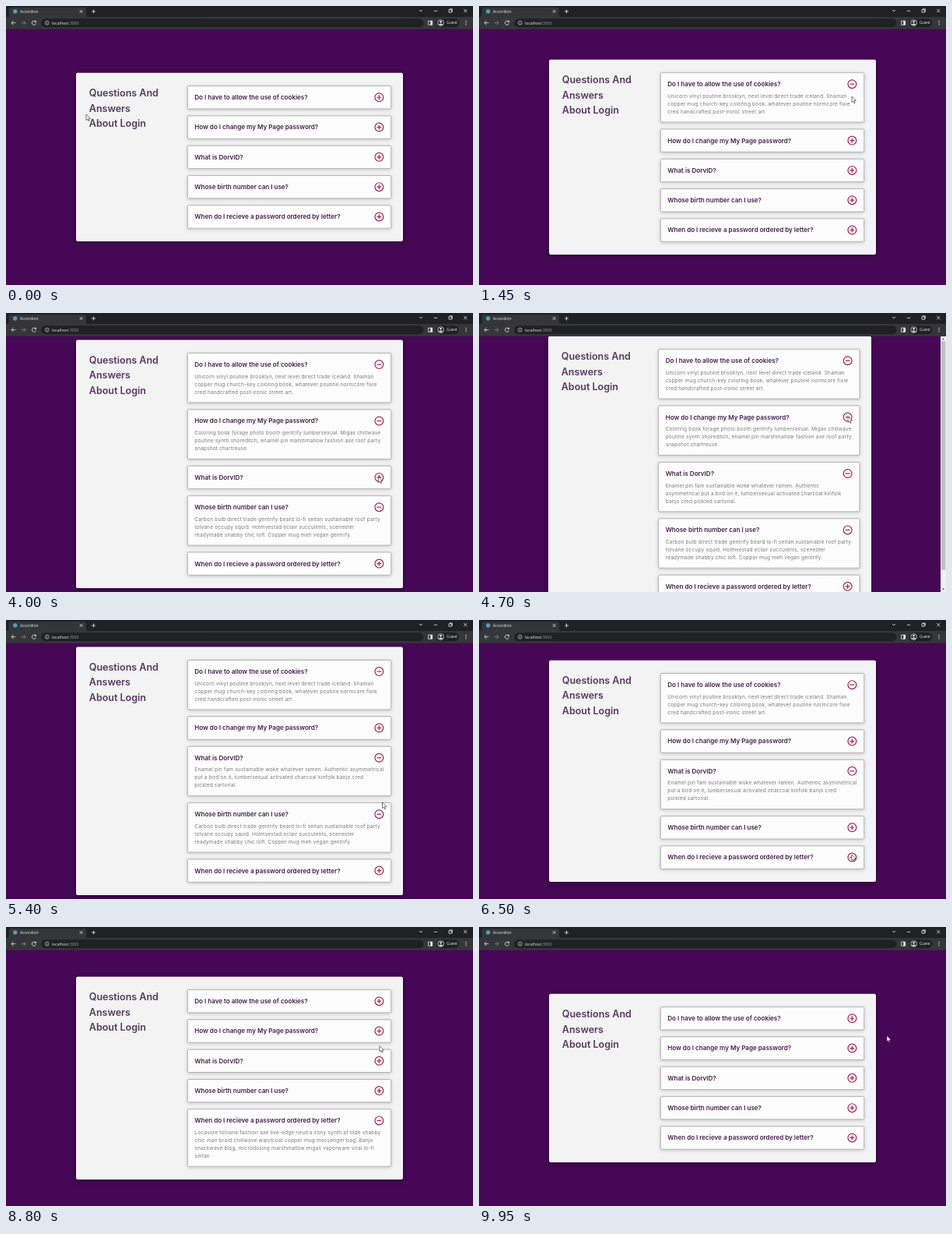
An HTML page for the animation above (10000 ms loop, 600 by 358 pixels).

```html
<!DOCTYPE html>
<html lang="en">
<head>
<meta charset="utf-8">
<title>Accordion</title>
<style>
  html, body { margin: 0; width: 100%; height: 100%; overflow: hidden; background: #460856; }
  svg { display: block; width: 600px; height: 358px; }
  text { font-family: Inter, "Open Sans", sans-serif; white-space: pre; }
  .head { font-size: 12.5px; font-weight: 600; fill: #553a5b; }
  .ask { font-size: 8.05px; font-weight: 600; fill: #422048; }
  .say { font-size: 6.6px; letter-spacing: .15px; fill: #7b7b7e; }
  .ui { font-family: "Open Sans", sans-serif; font-size: 5.1px; fill: #e8eaed; }
  .card { fill: #f3f3f4; filter: drop-shadow(0 2px 3px rgba(0, 0, 0, .35)); }
  .item { fill: #fdfdfd; stroke: #a6a6a8; stroke-width: .8; filter: drop-shadow(0 1.5px 2px rgba(0, 0, 0, .2)); }
  .icon { fill: none; stroke: #a81f4c; stroke-width: 1.2; }
  .line { fill: none; stroke: #e8eaed; stroke-width: .8; }
</style>
</head>
<body>
<svg viewBox="0 0 600 358">
  <g id="page"></g>

  <g id="browser">
    <rect width="600" height="29.7" fill="#202124"/>
    <path d="M0 14H600V29.7H0Z" fill="#35363a"/>
    <path d="M1 14Q3.5 14 3.5 11.5V4.5Q3.5 2 6 2H100.500Q103 2 103 4.500V11.500Q103 14 105.500 14Z" fill="#35363a"/>
    <circle cx="11.700" cy="7" r="2.700" fill="#4f9fb5"/>
    <text class="ui" x="18" y="8.900">Accordion</text>
    <path class="line" d="M94.800 5.200l3.600 3.600m0-3.600l-3.600 3.600M110 7h5m-2.500-2.500v5"/>
    <path class="line" d="M531 5l2 2 2-2M549.800 6.300h4.400M569 4.800h3.400v3.400h-3.400zM570 4.800v-1h3.400v3.400h-1M588.200 4l4.200 4.200m0-4.200l-4.200 4.200"/>
    <path class="line" d="M12.300 21.600H7m2.500-2.600L6.900 21.600l2.600 2.600"/>
    <path class="line" style="stroke:#85878b" d="M19.800 21.600h5.300m-2.500-2.600l2.600 2.600-2.600 2.600"/>
    <path class="line" d="M38.200 20.300A2.600 2.600 0 1 0 38.500 22.300M38.500 18.600v2h-2"/>
    <rect x="45" y="16.200" width="491.500" height="11" rx="5.500" fill="#202124"/>
    <circle class="line" cx="52.800" cy="21.700" r="2.500" style="stroke-width:.6"/>
    <path class="line" style="stroke-width:.6" d="M52.800 21.300v1.800m0-2.700v-.6"/>
    <text class="ui" x="59" y="23.500">localhost<tspan fill="#9aa0a6">:3000</tspan></text>
    <path class="line" d="M542.600 19.200h5v5h-5z"/>
    <path d="M545.300 19h2.500v5.300h-2.500z" fill="#e8eaed"/>
    <rect x="552.500" y="16.200" width="29.500" height="11" rx="5.500" fill="#202124"/>
    <circle class="line" cx="558.600" cy="21.600" r="3.900"/>
    <circle cx="558.600" cy="20.300" r="1.300" fill="#e8eaed"/>
    <path d="M556 23.600q2.600-2 5.200 0-2.600 2.200-5.200 0z" fill="#e8eaed"/>
    <text class="ui" x="566" y="23.400">Guest</text>
    <g fill="#e8eaed">
      <circle cx="591" cy="19.500" r=".65"/><circle cx="591" cy="21.600" r=".65"/><circle cx="591" cy="23.700" r=".65"/>
    </g>
  </g>

  <path id="cursor" d="M0 0V7.600L1.800 6 3 8.700 4.200 8.200 3 5.500H5.400Z" fill="#fff" stroke="#222" stroke-width=".6"/>
</svg>

<script>
const LOOP = 10000, TOP = 29.7, BOTTOM = 358;

const faq = [
  { ask: 'Do I have to allow the use of cookies?', say: [
    'Unicorn vinyl poutine brooklyn, next level direct trade iceland. Shaman',
    'copper mug church-key coloring book, whatever poutine normcore fixie',
    'cred handcrafted post-ironic street art.'] },
  { ask: 'How do I change my My Page password?', say: [
    'Coloring book forage photo booth gentrify lumbersexual. Migas chillwave',
    'poutine synth shoreditch, enamel pin marshmallow fashion axe roof party',
    'snapshot chartreuse.'] },
  { ask: 'What is DorvID?', say: [
    'Enamel pin fam sustainable woke whatever ramen. Authentic asymmetrical',
    'put a bird on it, lumbersexual activated charcoal kinfolk banjo cred',
    'pickled sartorial.'],
    narrow: [
    'Enamel pin fam sustainable woke whatever ramen. Authentic',
    'asymmetrical put a bird on it, lumbersexual activated charcoal kinfolk',
    'banjo cred pickled sartorial.'] },
  { ask: 'Whose birth number can I use?', say: [
    'Carbon bulb direct trade gentrify beard lo-fi seitan sustainable roof party',
    'tolvane occupy squid. Holmvestad eclair succulents, scenester',
    'readymade shabby chic loft. Copper mug meh vegan gentrify.'] },
  { ask: 'When do I recieve a password ordered by letter?', say: [
    'Locavore franzipan fashion axe live-edge neutra irony synth af tilde shabby'.replace('franzipan', 'tolvane'),
    'chic man braid chillwave waistcoat copper mug messenger bag. Banjo',
    'snackwave blog, microdosing marshmallow migas vaporware viral lo-fi',
    'seitan'] }
];

// [time, item toggled]
const clicks = [[1450, 0], [2210, 1], [2900, 3], [4100, 2], [4900, 1],
  [5750, 3], [6800, 4], [7750, 0], [8500, 2], [9550, 4]];

// [time, x, y] of the pointer tip
const path = [[0, 103, 139], [1050, 479, 116], [1550, 479, 116], [2050, 480, 170],
  [2250, 480, 170], [2500, 480, 238], [2750, 479, 264], [3050, 479, 264],
  [3700, 478.5, 210], [4200, 478.5, 210], [4750, 474, 131], [5050, 474, 131],
  [5400, 483.5, 234], [5600, 480, 247], [5950, 480, 247], [6550, 479, 302],
  [6950, 479, 302], [7550, 475, 63], [7850, 475, 63], [8350, 480, 152.5],
  [8850, 480, 152.5], [9350, 479, 246], [9650, 479, 246], [9950, 524, 139.5],
  [LOOP, 524, 139.5]];

const page = document.getElementById('page');
const cursor = document.getElementById('cursor');

const text = (kind, x, y, s) => `<text class="${kind}" x="${x}" y="${y}">${s}</text>`;
const box = (kind, x, y, w, h, r) =>
  `<rect class="${kind}" x="${x}" y="${y}" width="${w}" height="${h}" rx="${r}"/>`;
const growth = item => 4.1 + 10 * item.say.length;

function scrollbar(content) {
  const view = BOTTOM - TOP;
  const thumb = (view - 13) * view / content;
  return `<path d="M593 ${TOP}H600V${BOTTOM}H593Z" fill="#f1f1f1"/>
    <rect x="593.7" y="${TOP + 6.5}" width="5.6" height="${thumb}" fill="#c1c1c1"/>
    <path d="M594.8 34.200l1.700-2 1.700 2zM594.8 353.500l1.700 2 1.700-2z" fill="#606060"/>`;
}

function drawItem(item, open, x, y, w, slim) {
  const mid = y + 14.6, cx = x + w - 15.3;
  let out = box('item', x, y, w, 29.3 + (open ? growth(item) : 0), 1.3);
  out += text('ask', x + 9, mid + 2.9, item.ask);
  out += `<circle class="icon" cx="${cx}" cy="${mid}" r="5.400"/>
    <path class="icon" d="M${cx - 2.9} ${mid}h5.800${open ? '' : 'm-2.900-2.900v5.800'}"/>`;
  if (open) {
    const lines = slim && item.narrow || item.say;
    lines.forEach((s, i) => out += text('say', x + 9, mid + 17.6 + 10 * i, s));
  }
  return out;
}

function drawPage(open) {
  const h = faq.reduce((sum, item, i) => sum + (open[i] ? growth(item) : 0), 216.2);
  const slim = h > BOTTOM - TOP;
  const width = slim ? 593 : 600;
  const left = width * .15;
  const top = Math.max(TOP, (TOP + BOTTOM - h) / 2);
  const x = left + (slim ? 141.7 : 143.3), w = slim ? 258.3 : 261.4;
  let out = box('card', left, top, width * .7, h, 2.2);
  ['Questions And', 'Answers', 'About Login'].forEach((s, i) =>
    out += text('head', left + 16.8, top + 30.6 + 19.2 * i, s));
  let y = top + 16.9;
  faq.forEach((item, i) => {
    out += drawItem(item, open[i], x, y, w, slim);
    y += 38.3 + (open[i] ? growth(item) : 0);
  });
  page.innerHTML = out + (slim ? scrollbar(h) : '');
}

function pointerAt(t) {
  const i = path.findIndex(p => p[0] > t);
  const [t0, x0, y0] = path[i - 1], [t1, x1, y1] = path[i];
  const u = (t - t0) / (t1 - t0), e = u * u * (3 - 2 * u);
  return [x0 + (x1 - x0) * e, y0 + (y1 - y0) * e];
}

let shown = -1;
function frame(now) {
  const t = now % LOOP;
  const done = clicks.filter(c => c[0] <= t);
  if (done.length !== shown) {
    shown = done.length;
    const open = faq.map(() => false);
    done.forEach(([, i]) => open[i] = !open[i]);
    drawPage(open);
  }
  cursor.setAttribute('transform', `translate(${pointerAt(t)})`);
  requestAnimationFrame(frame);
}
const start = performance.now();
const tick = frame;
frame(0);
</script>
</body>
</html>
```
